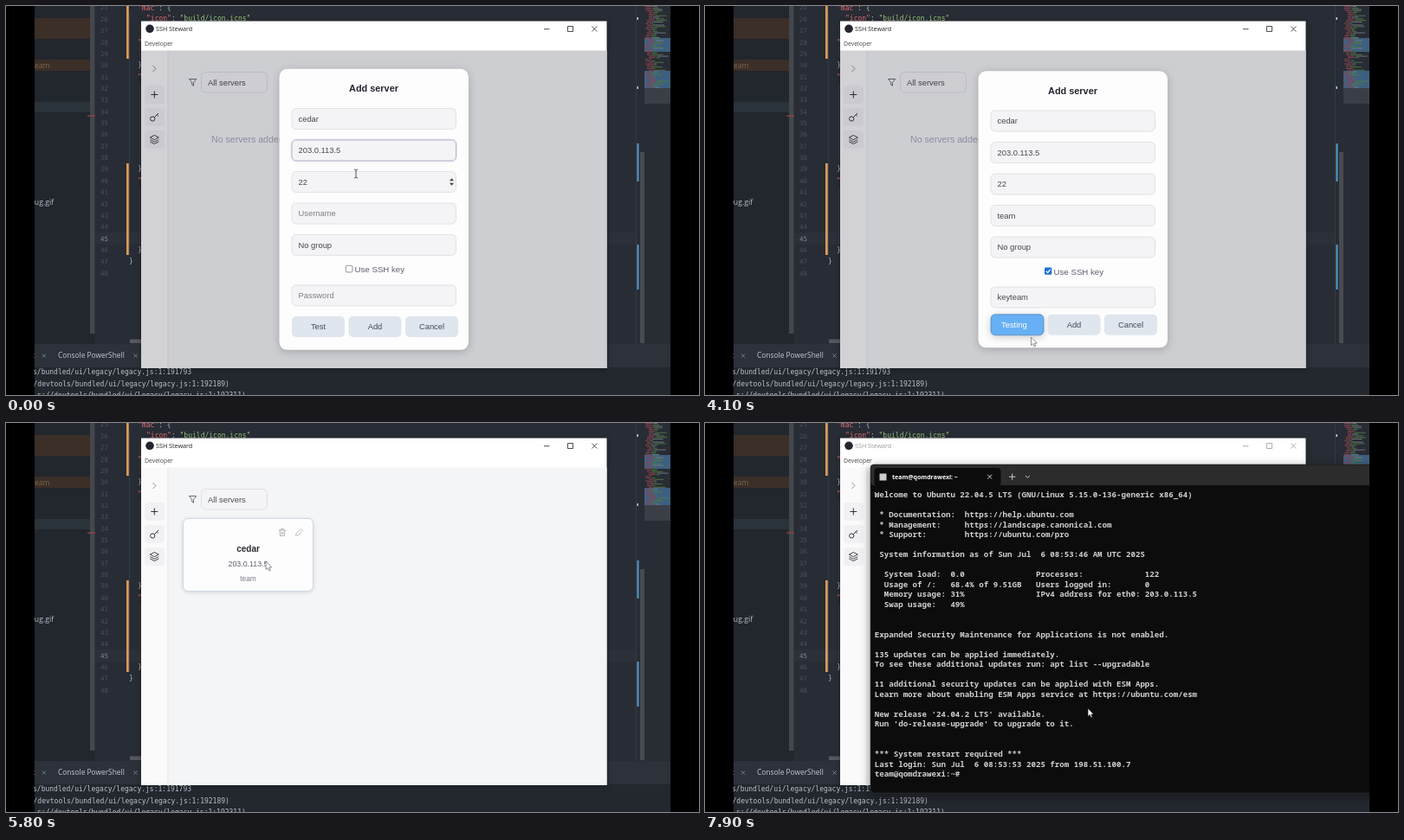
These frames come from a looping animation (800 by 450 pixels, 8000 ms). An HTML page:

```html
<!DOCTYPE html>
<html lang="en">
<head>
<meta charset="utf-8">
<title>Adding a server</title>
<style>
html, body { margin: 0; width: 100%; height: 100%; overflow: hidden; background: #000; }
svg { display: block; width: 800px; height: 450px; }
text { white-space: pre; font-family: "Liberation Sans", Arial, sans-serif; }
.ui { font-family: "Open Sans", "Noto Sans", sans-serif; }
.code { font-family: "DejaVu Sans Mono", monospace; }
.term { font-family: "Noto Sans Mono", "DejaVu Sans Mono", monospace; font-weight: 600; }
.soft { filter: drop-shadow(0 2px 5px #0003); }
.low { filter: drop-shadow(0 1px 3px #0004); }
.deep { filter: drop-shadow(0 3px 6px #0006); }
</style>
</head>
<body>
<svg viewBox="0 0 800 450"><g id="back"></g><g id="live"></g></svg>
<script>
const LOOP = 8000, STEP = 100;
const NAME = 'cedar', IP = '203.0.113.5', USER = 'team', KEY = 'keyteam';
const HOST = `${USER}@qomdrawexi`;

const rect = (x, y, w, h, fill, r = 0, more = '') =>
  `<rect x="${x}" y="${y}" width="${w}" height="${h}" fill="${fill}" rx="${r}" ${more}/>`;
const text = (x, y, s, size, fill, more = '') =>
  `<text x="${x}" y="${y}" font-size="${size}" fill="${fill}" ${more}>${s}</text>`;
const line = (d, color, w = 1, more = '') =>
  `<path d="${d}" fill="none" stroke="${color}" stroke-width="${w}" ${more}/>`;
const group = (x, y, s, more = '') => `<g transform="translate(${x} ${y})" ${more}>${s}</g>`;
const cross = (x, y, r, c) => line(`M${x - r} ${y - r}l${2 * r} ${2 * r}m0 ${-2 * r}l${-2 * r} ${2 * r}`, c, .8);
const MID = 'text-anchor="middle"', BOLD = 'font-weight="700"', UI = 'class="ui"', CODE = 'class="code"';

function minimap() {
  let seed = 7, s = '';
  const rnd = () => (seed = seed * 16807 % 2147483647) / 2147483647;
  s += rect(737, 37, 30, 16, '#3d5f80') + rect(737, 75, 30, 20, '#3d5f80') + rect(737, 95, 30, 18, '#3a3f47');
  for (let y = 0; y < 94; y += 1.8) {
    const x = 738 + Math.floor(rnd() * 3) * 2, w = 3 + rnd() * 6;
    s += rect(x, y, w, .9, '#8f4450') + rect(x + w + 1, y, rnd() * 15, .9, y % 3 < 1 ? '#757b85' : '#4f7a45');
  }
  return s;
}

function ide() {
  let s = rect(33, 0, 734, 450, '#282c34') + rect(33, 0, 70, 391, '#22262d');
  s += rect(33, 14, 64, 24, '#3b2f28') + rect(33, 62, 64, 13, '#3b2f28') + rect(33, 111, 64, 12, '#2a333a');
  s += rect(97, 0, 5.5, 379, '#44474d') + rect(94, 126.5, 9, 1.2, '#a3424b');
  s += text(33, 72, 'eam', 8.5, '#7d664c', UI) + text(27.5, 230, 'bug.gif', 8.7, '#b9bec8', UI);
  s += rect(103, 262, 625, 14, '#2c3039');
  for (let n = 25; n <= 48; n++)
    s += text(109, 17.8 + (n - 26) * 13.36, n, 7.4, n == 45 ? '#858b98' : '#4b5160', CODE);
  s += line('M142.5 8V288M154.5 22V60M154.5 90V182M154.5 210V276', '#3b4049', .7);
  s += rect(139, 0, 2.8, 61, '#d99a5b') + rect(139, 182, 2.8, 106, '#d99a5b');
  s += text(152, 4.5, '<tspan fill="#e06c75">"mac"</tspan>: {', 8, '#abb2bf', CODE);
  s += text(162, 17.3, '<tspan fill="#e06c75">"icon"</tspan>: <tspan fill="#98c379">"build/icon.icns"</tspan>', 8, '#abb2bf', CODE);
  for (const y of [71, 191, 285]) s += text(152, y, '}', 8, '#abb2bf', CODE);
  for (const y of [45, 85, 205]) s += text(152, y, '"', 8, '#e06c75', CODE);
  s += text(142, 298, '}', 8, '#abb2bf', CODE) + rect(143, 385.5, 14, 4.5, '#55585e');
  s += rect(727, 0, .7, 391, '#3a3f48') + rect(732, 169, 5, 221, '#484b51');
  s += rect(728.5, 159, 2, 44, '#539bd0') + rect(728.5, 276, 2, 52, '#539bd0');
  s += rect(728.5, 13, 1.5, 3, '#c8ccd2') + rect(728.5, 93, 1.5, 3, '#c8ccd2') + minimap();
  s += rect(33, 391, 734, 59, '#23272e') + rect(33, 391, 734, 27, '#2c313a');
  s += text(30.5, 407, 't', 8.4, '#b9bec8', UI) + cross(44, 404.5, 2, '#8b919c');
  s += text(60, 407, 'Console PowerShell', 8.4, '#c3c8d1', UI) + cross(149.5, 404.5, 2, '#8b919c');
  const path = '/bundled/ui/legacy/legacy.js:1:';
  s += text(31, 426, `s${path}191793`, 8, '#bcc1c9', CODE);
  s += text(31.5, 439.7, `/devtools${path}192189)`, 8, '#bcc1c9', CODE);
  s += text(36, 453, `s://devtools${path}192311)`, 8, '#bcc1c9', CODE);
  return s + rect(0, 0, 32.5, 450, '#000') + rect(767, 0, 33, 450, '#000');
}

function sidebar() {
  let s = rect(156, 51.5, 31, 367.5, '#fafafb') + rect(186.5, 51.5, .8, 367.5, '#e2e2e7');
  for (const y of [92, 118, 144]) s += rect(160, y, 23, 21, '#f1f1f4', 4);
  s += line('M169.5 69l3.5 3.5-3.5 3.5', '#85858c', .9);
  s += line('M171.3 98.5v8m-4-4h8', '#33333a', 1);
  s += line('M171.5 128.5l4.5-4.5m-1.8 1.8l1.6 1.6', '#33333a', 1) +
    '<circle cx="169.2" cy="130.5" r="2.6" fill="none" stroke="#33333a"/>';
  s += line('M171.3 149.5l5 2.6-5 2.6-5-2.6zM166.3 154.7l5 2.6 5-2.6M166.3 157l5 2.6 5-2.6', '#33333a', .9);
  return s;
}

function card() {
  let s = rect(204.5, 110.5, 150, 84, '#fdfdfe', 6, 'stroke="#cdd8e5" style="filter:drop-shadow(0 1px 2px #0002)"');
  s += line('M315 124h8m-5.3 0v-1.6h2.6v1.6M316 124l.5 6.5h5l.5-6.5M318.2 125.7v3.2m1.6-3.2v3.2', '#adadb2', .9);
  s += line('M334.5 130.5l.7-2.7 5.5-5.5 2 2-5.5 5.5z', '#b8b8bd', .9);
  s += text(279.5, 149, NAME, 10, '#2b2d35', `${MID} ${BOLD}`);
  s += text(279.5, 166, IP, 8.8, '#5f6470', MID);
  return s + text(279.5, 182.5, USER, 8.4, '#7d7f8a', MID);
}

function app(t) {
  const idle = t >= 6000, ink = idle ? '#9a9a9a' : '#222';
  let s = rect(156, 17.5, 537.5, 401.5, '#fff', 0, 'class="low"');
  s += '<circle cx="166" cy="26.3" r="4.8" fill="#23252f"/>';
  s += text(173, 29, 'SSH Steward', 7.2, ink, UI) + text(160, 46.3, 'Developer', 6.9, '#444', UI);
  s += line('M621 26.7h6.5M648.5 23.5h6v6h-6z', ink, .8) + cross(679.3, 26.5, 3, ink);
  s += rect(187, 51.5, 506.5, 367.5, '#f4f5f7') + sidebar();
  s += line('M211.5 84.5h8.2l-3.2 4v3.8l-1.8-1.3v-2.5z', '#5b5e68', .9);
  s += rect(225.5, 76.5, 76, 23.5, '#f4f4f6', 5, 'stroke="#dedee4"') + text(233, 92, 'All servers', 9.4, '#4a4d57');
  return s + (t < 5200 ? text(237, 158, 'No servers added', 10.6, '#a8a6bd') : card());
}

function field(y, value, hint, focus, white) {
  const edge = focus ? `stroke="#b3b5c6" style="filter:drop-shadow(0 0 1px #8886c066)"` : 'stroke="#e2e2e7"';
  return rect(330, y, 189.5, 24, white ? '#fdfdfe' : '#f4f4f6', 5, edge) +
    text(337.5, y + 15.4, value || hint, 9.4, value ? '#454852' : '#7c7f88');
}

function button(x, y, label, hot) {
  return hot
    ? rect(x, y, 61, 24, '#67b0f5', 5, 'stroke="#4d83bb" stroke-width=".7" class="soft"') + text(x + 12, y + 15.3, label, 9.4, '#fff')
    : rect(x, y, 61, 24, '#dfe6ed', 5) + text(x + 30.5, y + 15.3, label, 9.4, '#454a55', MID);
}

function modal(t) {
  const keyed = t >= 2200, dy = keyed ? 2.5 : 0;
  const testing = t >= 3700 && t < 4600;
  const typed = USER.slice(0, Math.max(0, Math.floor((t - 1200) / 150)));
  const onUser = t >= 1000 && !keyed;
  let form = text(424.5, 99, 'Add server', 10.9, '#23252e', `${MID} ${BOLD}`);
  form += field(118.5, NAME) + field(155, IP, '', t < 1000) + field(191.5, '22');
  if (t < 600) form += `<path d="M512 202.3l2.5-3 2.5 3zM512 204.7l2.5 3 2.5-3z" fill="#444"/>`;
  form += field(228, typed, 'Username', onUser) + field(264.5, 'No group');
  if (onUser && (typed || t % 1000 < 500))
    form += rect(337.6 + typed.length * 5.1, 234.5, .8, 11, '#333');
  form += keyed
    ? rect(392, 300, 8.3, 8.3, '#1f6fd8', 1.3) + line('M393.8 304.2l1.8 1.8 3.2-3.8', '#fff', 1.2)
    : rect(392.3, 300.3, 7.6, 7.6, '#fff', 1.3, 'stroke="#777" stroke-width=".8"');
  form += text(402.5, 308.3, 'Use SSH key', 9.7, '#5d616c');
  const picking = keyed && t >= 2400 && t < 3700, by = keyed ? 356.8 : 359;
  return rect(156, 51.5, 537.5, 367.5, '#000014', 0, 'opacity=".16"') +
    rect(315.5, 72.8 + dy, 218.5, 325 - 2 * dy, '#fdfdfe', 9, 'class="soft"') +
    group(0, dy, form) +
    (keyed ? field(325, KEY, '', picking, picking) : field(322.8, '', 'Password')) +
    button(330, by, testing ? 'Testing' : 'Test', testing) +
    button(395.5, by, 'Add') + button(461, by, 'Cancel');
}

const OUTPUT = `Welcome to Ubuntu 22.04.5 LTS (GNU/Linux 5.15.0-136-generic x86_64)

 * Documentation:  https://help.ubuntu.com
 * Management:     https://landscape.canonical.com
 * Support:        https://ubuntu.com/pro

 System information as of Sun Jul  6 08:53:46 AM UTC 2025

  System load:  0.0               Processes:             122
  Usage of /:   68.4% of 9.51GB   Users logged in:       0
  Memory usage: 31%               IPv4 address for eth0: ${IP}
  Swap usage:   49%


Expanded Security Maintenance for Applications is not enabled.

135 updates can be applied immediately.
To see these additional updates run: apt list --upgradable

11 additional security updates can be applied with ESM Apps.
Learn more about enabling ESM Apps service at https://ubuntu.com/esm

New release '24.04.2 LTS' available.
Run 'do-release-upgrade' to upgrade to it.


*** System restart required ***
Last login: Sun Jul  6 08:53:53 2025 from 198.51.100.7
${HOST}:~#`.split('\n');

function terminal(t) {
  const drag = Math.min(1, Math.max(0, (t - 6200) / 400)), ready = t >= 6900;
  let s = rect(0, 0, 620, 380, '#0c0c0c', 4, 'stroke="#333" stroke-width=".6" class="deep"');
  s += rect(.4, .4, 620, 24, '#2c2c2c', 4) + rect(4.5, 4, 146, 21, '#0c0c0c', 4) + rect(.4, 24, 620, 4, '#0c0c0c');
  s += rect(10.5, 10.5, 8, 8, '#ccc');
  s += `<svg x="25" y="4" width="101.5" height="20">` +
    text(0, 13, ready ? `${HOST}: ~` : 'C:\\Windows\\system32\\cmd.exe', 7, '#fff', `${UI} ${BOLD}`) + '</svg>';
  s += cross(137.7, 14.2, 2.5, '#fff') + line('M160 14.2h7.4m-3.7-3.7v7.4M179 13l2.4 2.4 2.4-2.4', '#ddd', .9);
  if (ready) OUTPUT.forEach((row, i) => s += text(4.8, 38 + i * 11.54, row, 9.13, '#cfcfcf', 'class="term"'));
  else s += rect(4.6, 29, .9, 11.2, '#eee');
  return `<svg width="767" height="450">${group(202 - 11 * drag, 51 - 3 * drag, s)}</svg>`;
}

// Pointer stops: time, x, y
const STOPS = [[0, 404, 194], [300, 404, 194], [900, 386, 238], [1700, 386, 238], [2100, 396, 303],
  [2400, 362, 334], [2600, 362, 334], [2800, 355, 317], [3500, 360, 368], [3800, 360, 368], [4100, 376.5, 383],
  [4600, 400, 378], [4900, 426, 368], [5200, 426, 368], [5600, 405, 216], [5800, 300, 160], [5900, 300, 160],
  [6200, 480, 71], [6600, 469, 68], [6900, 469, 68], [7500, 442, 330], [8000, 442, 330]];

function pointer(t) {
  const i = STOPS.findIndex(p => p[0] > t), [t0, x0, y0] = STOPS[i - 1], [t1, x1, y1] = STOPS[i];
  const u = (t - t0) / (t1 - t0), e = u * u * (3 - 2 * u);
  const shape = t < 1900
    ? line('M-2.2-5q2.2 0 2.2 1.2V3.8q0 1.2-2.2 1.2M2.2-5q-2.2 0-2.2 1.2M0 3.8q0 1.2 2.2 1.2', '#444', .9)
    : `<path d="M0 0V9.6L2.2 7.6 3.8 11 5.3 10.3 3.8 7H6.7Z" fill="#fff" stroke="${t < 6000 ? '#666' : '#111'}" stroke-width=".7"/>`;
  return group(x0 + (x1 - x0) * e, y0 + (y1 - y0) * e, shape);
}

const back = document.getElementById('back'), live = document.getElementById('live');
back.innerHTML = ide();
let shown = -1;

function frame() {
  const t = Math.floor(performance.now() % LOOP / STEP) * STEP;
  if (t !== shown) {
    shown = t;
    live.innerHTML = app(t) + (t < 5200 ? modal(t) : '') + (t >= 6000 ? terminal(t) : '') + pointer(t);
  }
  requestAnimationFrame(frame);
}
frame();
</script>
</body>
</html>
```
